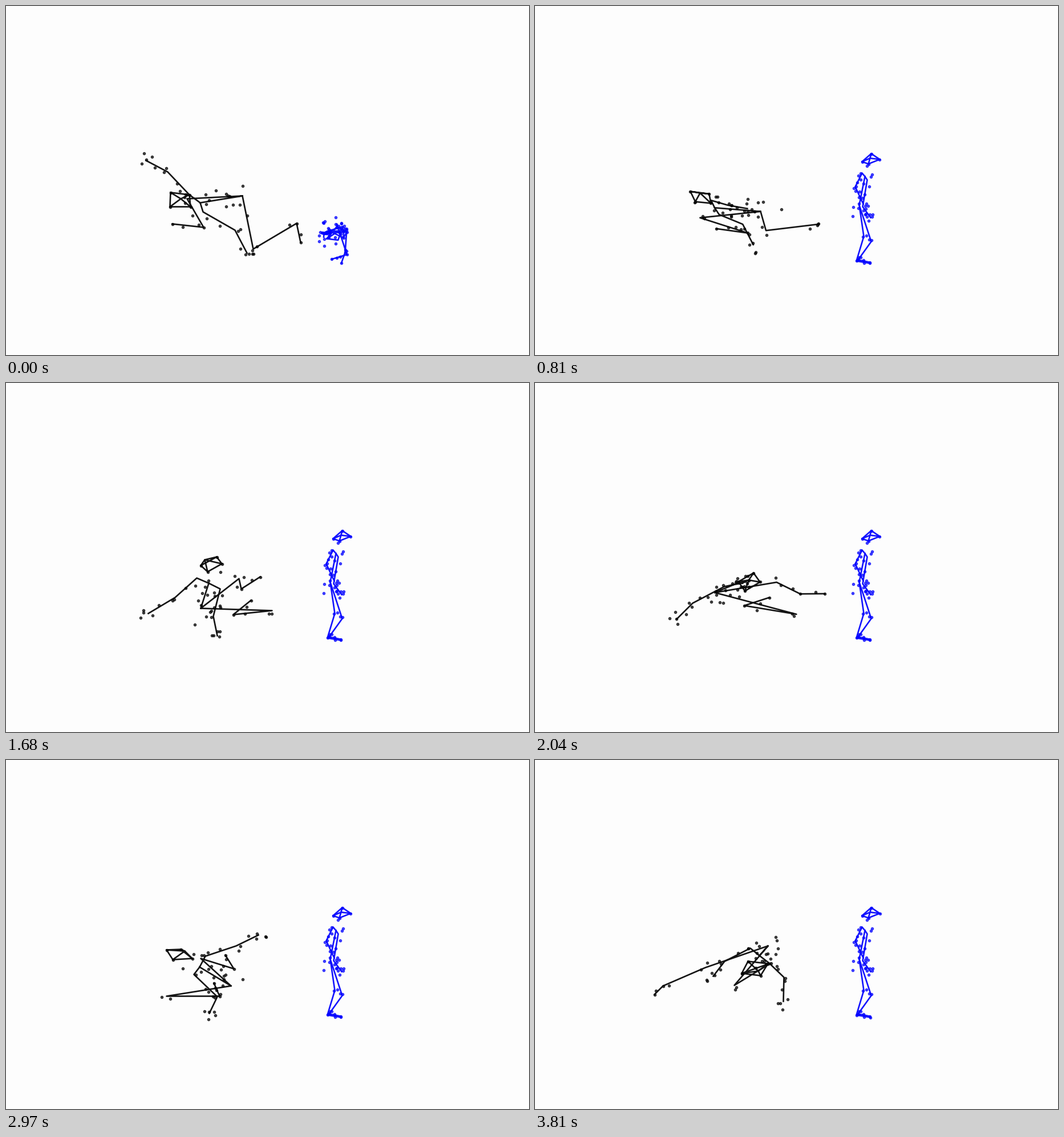
A matplotlib script that plays this animation: 917x611 px, repeating every 3840 ms.

```python
import numpy as np
import matplotlib.pyplot as plt
from matplotlib.animation import FuncAnimation

W, H, DPI = 917, 611, 100
FRAMES, STEP = 128, 30
SPIN = 2 * np.pi / 83   # markers circle the bones once per body turn

# Joint order: head 0-4, neck 5, pelvis 6, arms 7-12 (shoulder, elbow, hand),
# legs 13-18 (knee, ankle, toe).
CHAINS = [[0, 1, 2, 3, 0, 4, 2], [1, 4, 3], [9, 8, 7, 5, 10, 11, 12],
          [5, 6], [15, 14, 13, 6, 16, 17, 18]]
DOTTED = [0, 1, 2, 3, 14, 15, 17, 18]


def pose(head, spine, arm1, arm2, leg1, leg2):
    return np.array(head + spine + arm1 + arm2 + leg1 + leg2, float)


KEYS = {
    0: pose([(289, 327), (322, 331), (324, 352), (288, 352), (307, 338)],
            [(341, 345), (415, 333)],
            [(322, 331), (284, 291), (246, 271)],
            [(346, 361), (402, 393), (423, 433)],
            [(318, 338), (347, 388), (292, 382)],
            [(434, 426), (510, 381), (517, 414)]),
    16: pose([(254, 302), (286, 308), (283, 325), (248, 321), (268, 306)],
             [(306, 334), (395, 345)],
             [(310, 317), (364, 294), (392, 275)],
             [(292, 347), (340, 372), (369, 408)],
             [(315, 346), (351, 400), (299, 394)],
             [(436, 439), (521, 408), (525, 427)]),
    39: pose([(309, 351), (342, 350), (353, 366), (333, 368), (328, 352)],
             [(338, 374), (392, 378)],
             [(315, 366), (292, 405), (306, 438)],
             [(372, 385), (400, 401), (405, 437)],
             [(296, 398), (398, 395), (354, 383)],
             [(377, 340), (457, 350), (461, 329)]),
    56: pose([(342, 320), (370, 305), (379, 317), (354, 331), (349, 310)],
             [(356, 351), (342, 395)],
             [(335, 342), (297, 376), (250, 404)],
             [(376, 361), (364, 409), (371, 443)],
             [(467, 399), (399, 406), (430, 381)],
             [(409, 343), (413, 361), (446, 340)]),
    80: pose([(353, 376), (379, 365), (394, 385), (366, 398), (385, 382)],
             [(339, 361), (314, 345)],
             [(326, 377), (273, 404), (274, 433)],
             [(353, 345), (357, 298), (388, 260)],
             [(404, 402), (345, 371), (378, 367)],
             [(410, 364), (505, 382), (543, 396)]),
    99: pose([(282, 333), (307, 332), (327, 348), (293, 350), (314, 335)],
             [(340, 363), (395, 396)],
             [(330, 376), (371, 415), (357, 444)],
             [(350, 344), (404, 326), (443, 307)],
             [(342, 348), (400, 366), (385, 342)],
             [(282, 414), (375, 414), (365, 391)]),
    127: pose([(374, 353), (409, 357), (396, 378), (363, 374), (392, 370)],
              [(394, 343), (409, 326)],
              [(411, 356), (437, 381), (436, 423)],
              [(378, 330), (333, 353), (313, 379)],
              [(350, 395), (414, 356), (363, 374)],
              [(299, 364), (225, 396), (210, 411)]),
}
STAND = pose([(590, 259), (605, 269), (585, 277), (574, 273), (588, 267)],
             [(579, 299), (569, 349)],
             [(574, 293), (562, 317), (576, 347)],
             [(583, 305), (575, 352), (589, 371)],
             [(577, 404), (564, 447), (588, 451)],
             [(590, 413), (567, 445), (587, 449)])

rng = np.random.default_rng(4)


def scatter(n):
    """Random points in the unit disc."""
    a, r = rng.uniform(0, 2 * np.pi, n), np.sqrt(rng.uniform(0, 1, n))
    return np.column_stack([r * np.cos(a), r * np.sin(a)])


# The crouched start: a small heap of joints with the feet lowest.
HUDDLE = np.array([575, 399]) + scatter(len(STAND)) * [24, 18]
HUDDLE[[14, 15, 17, 18]] += [5, 38]


class Markers:
    """Loose markers strewn along the bones, turning with the body."""

    def __init__(self):
        rows = []
        for s in (7, 10):
            rows += self.strew(s, s + 1, 0.2, 1.0, 3, 10)
            rows += self.strew(s + 1, s + 2, 0.1, 0.7, 2, 8)
            rows += self.strew(s + 1, s + 2, 0.95, 1.15, 4, 12)
        rows += self.strew(5, 6, -0.2, 1.2, 12, 27)
        for k in (13, 16):
            rows += self.strew(6, k, 0.3, 1.0, 2, 14)
            rows += self.strew(k, k + 1, 0.0, 0.8, 2, 9)
            rows += self.strew(k + 1, k + 2, 0.3, 0.9, 1, 6)
        a, b, t, dx, dy = np.array(rows).T
        self.a, self.b = a.astype(int), b.astype(int)
        self.t, self.off = t[:, None], np.column_stack([dx, dy])

    @staticmethod
    def strew(a, b, lo, hi, n, spread):
        along = np.linspace(lo, hi, n) if n > 1 else [(lo + hi) / 2]
        return [(a, b, t, dx, dy)
                for t, (dx, dy) in zip(along, scatter(n) * spread)]

    def place(self, p, scale, turn):
        c, s = np.cos(turn), np.sin(turn)
        off = self.off @ np.array([[c, s], [-s, c]])
        return p[self.a] + (p[self.b] - p[self.a]) * self.t + off * scale


times = np.array(list(KEYS), float)
keys = np.array(list(KEYS.values()))
slopes = np.gradient(keys, times, axis=0)


def dancer(i):
    """Cubic Hermite blend between the key poses: joints, spread, turn."""
    k = min(np.searchsorted(times, i, side="right") - 1, len(times) - 2)
    span = times[k + 1] - times[k]
    u = (i - times[k]) / span
    p = keys[k] + (keys[k + 1] - keys[k]) * u * u * (3 - 2 * u)
    p = p + span * u * (1 - u) * ((1 - u) * slopes[k] - u * slopes[k + 1])
    return p, 1, SPIN * i


def stander(i):
    """The huddle unfolds and settles into the standing pose."""
    left = np.exp(-i / 3)
    return STAND + (HUDDLE - STAND) * left, 0.6 + 0.4 * left, 0


fig = plt.figure(figsize=(W / DPI, H / DPI), dpi=DPI, facecolor="#fdfdfd")
ax = fig.add_axes([0, 0, 1, 1])
ax.set(xlim=(0.5, W + 0.5), ylim=(H + 0.5, 0.5))
ax.axis("off")


class Body:
    def __init__(self, color, move):
        self.move, self.markers = move, Markers()
        self.dots, = ax.plot([], [], "o", color=color, ms=3, mew=1, alpha=0.7)
        self.bones, = ax.plot([], [], color=color, lw=1.9, alpha=0.92,
                              solid_joinstyle="round")

    def draw(self, i):
        p, scale, turn = self.move(i)
        gap = np.full((1, 2), np.nan)
        path = np.vstack([q for c in CHAINS for q in (p[c], gap)])
        loose = self.markers.place(p, scale, turn)
        self.bones.set_data(*path.T)
        self.dots.set_data(*np.vstack([p[DOTTED], loose]).T)
        return self.dots, self.bones


bodies = [Body("black", dancer), Body("blue", stander)]


def update(i):
    return [artist for b in bodies for artist in b.draw(i)]


anim = FuncAnimation(fig, update, frames=FRAMES, interval=STEP,
                     repeat=True, repeat_delay=0, blit=False)
plt.show()
```
